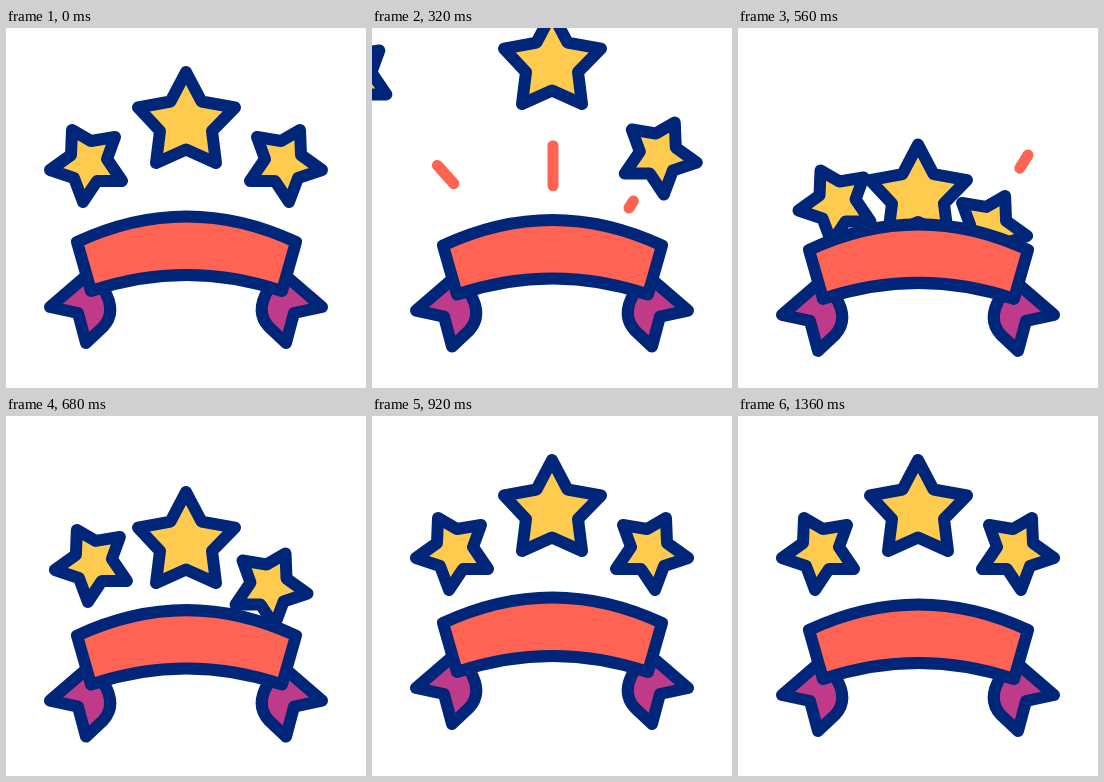
Write an HTML page that moves like this. It is 360 px wide and 360 px high and loops after 1480 ms.

```html
<!DOCTYPE html>
<html>
<head>
<meta charset="utf-8">
<title>Stars and ribbon</title>
<style>
  html, body { margin: 0; height: 100%; overflow: hidden; background: #fff; }
  svg { display: block; width: 100vw; height: 100vh; }
  .shape { stroke: #00267a; stroke-width: 12; stroke-linejoin: round; }
  .star { fill: #ffcb4f; }
  .tail { fill: #c03a8a; }
  .band, .trail { fill: #ff6353; }
  .trail { stroke: #ff6353; stroke-width: 11; stroke-linecap: round; }
</style>
</head>
<body>
<svg viewBox="0 0 360 360">
  <defs>
    <path id="side" class="shape star" d="M66 102L85 113L109 109L101 131L116 153L91 153L77 174L68 150L44 142L65 127Z"/>
    <path id="tail" class="shape tail" d="M80 248L44 279L72 285L80 315L97 299Q111 284 98 262Z"/>
    <clipPath id="aboveBand"><path d="M-9-9H369V238H281Q180 209 79 238H-9Z"/></clipPath>
  </defs>
  <g clip-path="url(#aboveBand)">
    <line class="trail"/><line class="trail"/><line class="trail"/>
    <g><use href="#side" class="mover"/></g>
    <path class="shape star mover" d="M180 44L195.500 73.500L229 79.500L206 103L210 135L180 121.500L150 135L154 103L132 79.500L164.500 73.500Z"/>
    <g transform="translate(360) scale(-1 1)"><use href="#side" class="mover"/></g>
  </g>
  <g id="ribbon">
    <use href="#tail"/>
    <use href="#tail" transform="translate(360) scale(-1 1)"/>
    <path class="shape band" d="M71 214Q180.500 163 290 214L276 263Q180.500 231 85 263Z"/>
  </g>
</svg>
<script>
const LOOP = 1480, OUT = 150, BACK = 400;
const movers = document.querySelectorAll('.mover');
const trails = document.querySelectorAll('line');
const ribbon = document.getElementById('ribbon');

// out and back: vectors of the exit and of the hidden place behind the band
const stars = [
  { start: 190, out: [-128, -109], back: [40, 98], trailStart: 180, line: [88.4, 163, 63.7, 135.6] },
  { start: 240, out: [0, -168], back: [0, 134], trailStart: 240, line: [181, 158, 181, 98] },
  { start: 290, out: [-128, -109], back: [40, 98], trailStart: 308, line: [257, 180, 290, 127] }
];

const progress = (t, from, to) => Math.min(1, Math.max(0, (t - from) / (to - from)));
const smooth = u => u * u * (3 - 2 * u);
const mix = (a, b, u) => a + (b - a) * u;

function moveStar(star, node, t) {
  const age = t - star.start;
  const away = age < OUT;
  const amount = away
    ? progress(age, 0, OUT) ** 1.7
    : (1 - progress(age, OUT, OUT + BACK)) ** 1.1;
  const [x, y] = away ? star.out : star.back;
  node.setAttribute('transform', `translate(${x * amount} ${y * amount})`);
}

function drawTrail({ trailStart, line: [x1, y1, x2, y2] }, node, t) {
  const age = t - trailStart;
  const head = 1 - (1 - progress(age, 0, 190)) ** 2;
  const tail = progress(age, 80, 310);
  node.setAttribute('visibility', head > 0 && tail < 1 ? 'visible' : 'hidden');
  node.setAttribute('x1', mix(x1, x2, tail));
  node.setAttribute('y1', mix(y1, y2, tail));
  node.setAttribute('x2', mix(x1, x2, head));
  node.setAttribute('y2', mix(y1, y2, head));
}

function ribbonOffset(t) {
  return 8 * smooth(progress(t, 80, 600))
    - 15 * smooth(progress(t, 600, 920))
    + 7 * smooth(progress(t, 920, 1360));
}

function draw() {
  const t = performance.now() % LOOP;
  stars.forEach((star, i) => {
    moveStar(star, movers[i], t);
    drawTrail(star, trails[i], t);
  });
  ribbon.setAttribute('transform', `translate(0 ${ribbonOffset(t)})`);
  requestAnimationFrame(draw);
}
draw();
</script>
</body>
</html>
```
